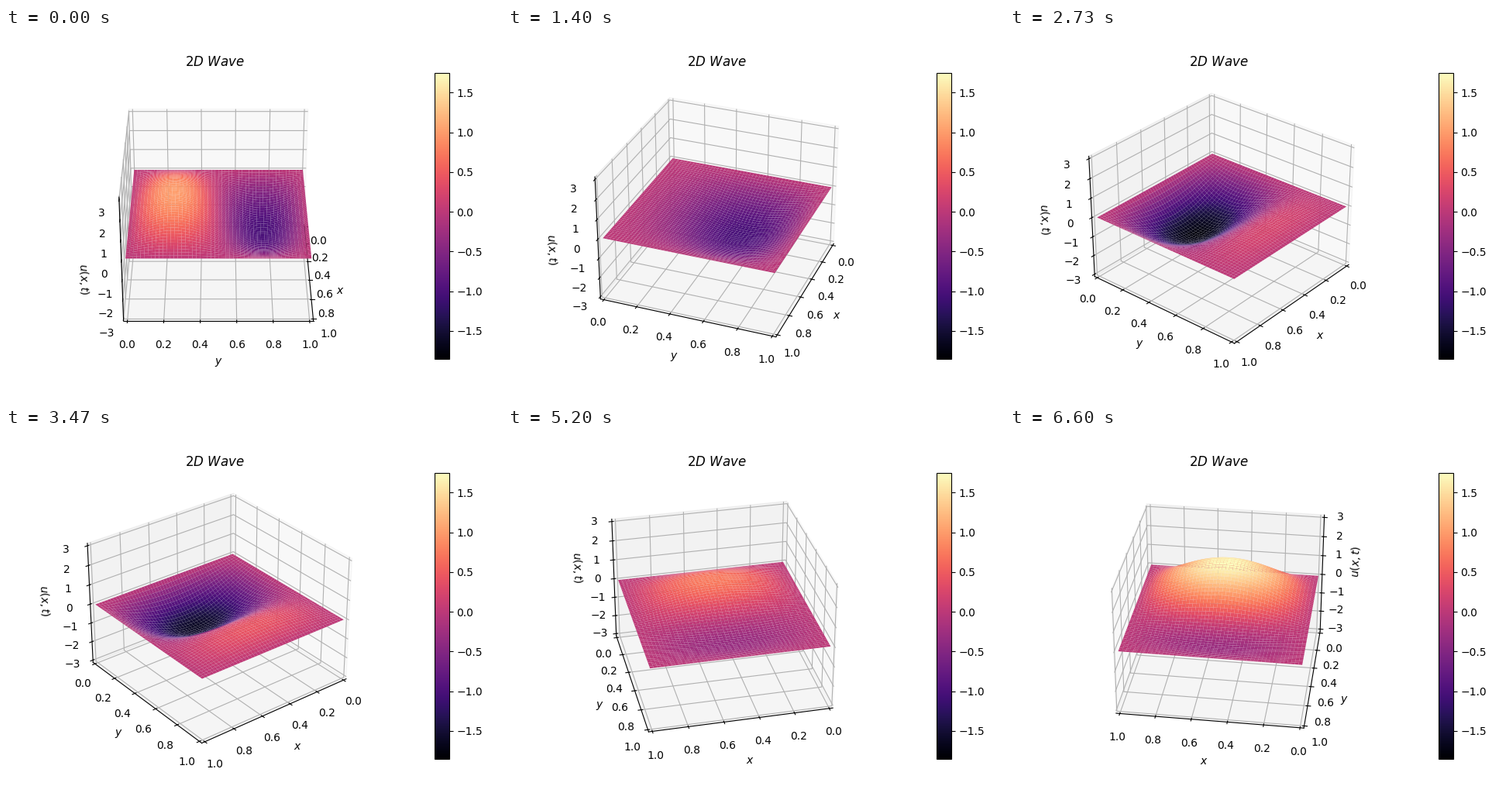
A matplotlib script that plays this animation: 640 px wide and 480 px high, repeating every 6670 ms.

```python
import numpy as np
import matplotlib.pyplot as plt
from matplotlib.animation import FuncAnimation
from matplotlib.cm import ScalarMappable
from matplotlib.colors import Normalize

FRAMES = 100
LOOP_MS = 6670
MARGIN = 1 / 48   # share of each axis left free at both ends

norm = Normalize(-1.853, 1.750)
s = np.linspace(0, 1, 51)
X, Y = np.meshgrid(s, s)
mode11 = np.sin(np.pi * X) * np.sin(np.pi * Y)
mode12 = np.sin(np.pi * X) * np.sin(2 * np.pi * Y)


def padded(lo, hi):
    pad = MARGIN * (hi - lo)
    return lo - pad, hi + pad


fig = plt.figure(figsize=(6.4, 4.8), dpi=100)
ax = fig.add_subplot(projection="3d")
ax.set_title(r"$2D\ Wave$")
fig.colorbar(ScalarMappable(norm, "magma"), ax=ax, fraction=0.046, pad=0.2)
ax.set(xlim=padded(0, 1), ylim=padded(0, 1), zlim=padded(-3, 3),
       xlabel="$x$", ylabel="$y$", zlabel="$u(x,t)$")
surface = None


def wave(t):
    """Two standing modes of a unit membrane with wave speed 1."""
    return (1.04 * np.cos(np.sqrt(5) * np.pi * t - 0.17) * mode12
            - 1.14 * np.sin(np.sqrt(2) * np.pi * t) * mode11)


def update(i):
    global surface
    if surface is not None:
        surface.remove()
    surface = ax.plot_surface(X, Y, wave(i / FRAMES), cmap="magma", norm=norm,
                              rstride=1, cstride=1)
    # plotting may widen the view, so the limits are set again
    ax.set(xlim=padded(0, 1), ylim=padded(0, 1), zlim=padded(-3, 3))
    ax.view_init(elev=30, azim=i)
    return surface,


anim = FuncAnimation(fig, update, frames=FRAMES, interval=LOOP_MS / FRAMES,
                     init_func=lambda: update(0), repeat=True, repeat_delay=0)
plt.show()
```
